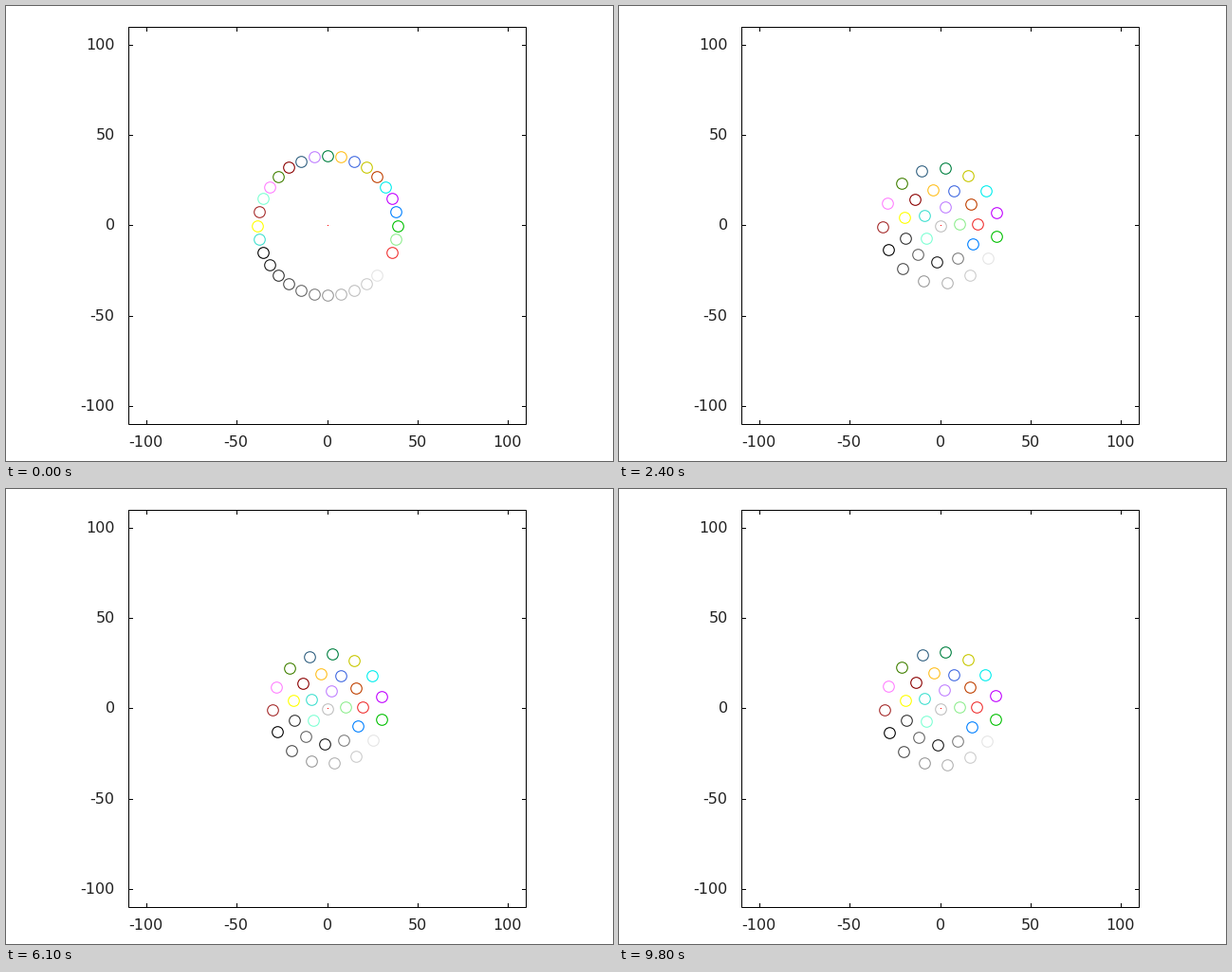
A matplotlib script that plays this animation: 640x480 px, repeating every 9.9 s.

```python
import numpy as np
import matplotlib.pyplot as plt
from matplotlib.animation import FuncAnimation
from matplotlib.patches import Rectangle

WIDTH, HEIGHT, DPI = 640, 480, 100
FRAMES, INTERVAL = 99, 100
PX = 72 / DPI  # one pixel in points
CENTRE = np.array([339.0, 231.7])
RING_RADIUS = 73.7
CIRCLE_RADIUS = 5.8

COLORS = """
#00c000 #0080ff #c000ff #00eeee #c04000 #c8c800 #4169e1 #ffc020
#008040 #c080ff #306080 #8b0000 #408000 #ff80ff #7fffd4 #a52a2a
#ffff00 #40e0d0 #000000 #1a1a1a #333333 #4d4d4d #666666 #7f7f7f
#999999 #b3b3b3 #c0c0c0 #cccccc #e5e5e5 #ffffff #f03232 #90ee90
""".split()
COUNT = len(COLORS)

# Resting shells: radius, angle of the first member, settling time in frames,
# members counter-clockwise.
SHELLS = [
    (59.2, -11, 10.0, [0, 2, 3, 5, 8, 10, 12, 13, 15, 18, 21, 24, 25, 27, 28]),
    (38.0, 3, 8.2, [30, 4, 6, 7, 11, 16, 20, 22, 19, 23, 1]),
    (19.8, 5, 5.5, [31, 9, 17, 14, 29]),
    (0.0, 0, 5.5, [26]),
]


def circle_points(radius, count, first=0):
    angle = np.radians(first) + 2 * np.pi * np.arange(count) / count
    return radius * np.column_stack((np.cos(angle), -np.sin(angle)))


ring = circle_points(RING_RADIUS, COUNT)
rest = np.zeros((COUNT, 2))
settle = np.zeros((COUNT, 1))
for radius, first, tau, members in SHELLS:
    rest[members] = circle_points(radius, len(members), first)
    settle[members] = tau


def collapse(t):
    """Relative radius while the ring falls in and bounces back."""
    return np.sqrt(0.56 + 0.44 * np.cos(np.pi * t / 5.2))


def breathe(t):
    """Damped breathing of the cluster."""
    return 1 + 0.13 * np.exp(-t / 30) * np.cos(2 * np.pi * t / 11)


def positions(t):
    w = 1 - np.exp(-(t / settle) ** 2)
    return np.round(CENTRE + (1 - w) * collapse(t) * ring + w * breathe(t) * rest)


def line(xs, ys):
    ax.plot(xs, ys, color="black", lw=PX, snap=False, solid_joinstyle="miter")


def draw_axes(left=129, right=548, top=22, bottom=441, tick=4):
    line([left, right, right, left, left], [top, top, bottom, bottom, top])
    for value in range(-100, 101, 50):
        x = round(338.7 + 1.905 * value)
        y = round(231.4 - 1.905 * value)
        line([x, x], [bottom, bottom - tick])
        line([x, x], [top, top + tick])
        line([left, left + tick], [y, y])
        line([right, right - tick], [y, y])
        ax.text(x - 0.8, 464.7, str(value), ha="center", va="baseline")
        ax.text(114.2, y + 4.3, str(value), ha="right", va="baseline")


plt.rcParams.update({"font.family": "DejaVu Sans", "font.size": 16 * PX,
                     "text.color": "#202020", "axes.unicode_minus": False})
fig = plt.figure(figsize=(WIDTH / DPI, HEIGHT / DPI), dpi=DPI, facecolor="white")
ax = fig.add_axes([0, 0, 1, 1])
ax.set_axis_off()
draw_axes()
ax.add_patch(Rectangle((338.5, 230.5), 1, 1, color="red", lw=0))
start = positions(0)
circles = ax.scatter(start[:, 0], start[:, 1], s=(2 * CIRCLE_RADIUS * PX) ** 2,
                     facecolors="none", edgecolors=COLORS, linewidths=1.1 * PX,
                     zorder=3)
ax.set_xlim(-0.5, WIDTH - 0.5)
ax.set_ylim(HEIGHT - 0.5, -0.5)


def update(frame):
    circles.set_offsets(positions(frame))
    return (circles,)


anim = FuncAnimation(fig, update, frames=FRAMES, interval=INTERVAL,
                     repeat=True, repeat_delay=0, blit=False)
plt.show()
```
